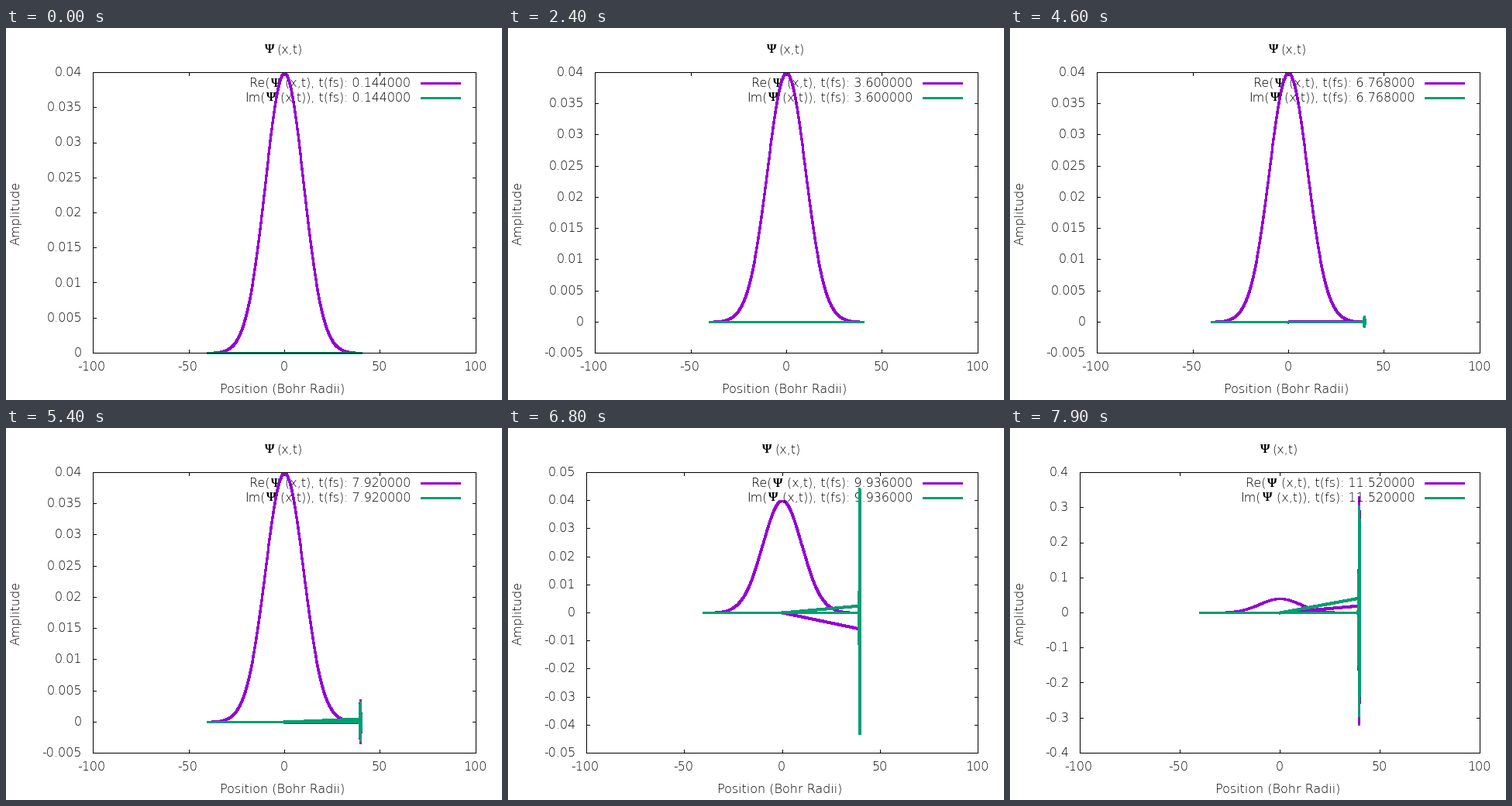
Recreate the animation shown at these times as a matplotlib script. Size 640 px wide and 480 px high, loop 8000 ms.

```python
import numpy as np
import matplotlib.pyplot as plt
from matplotlib.animation import FuncAnimation

W, H = 640, 480
PT = 0.72                       # points per pixel at 100 dpi
PURPLE, GREEN = "#9400d3", "#009e73"
TOP, BOTTOM, RIGHT = 57, 419, 606
KEY_RIGHT = 523
DIGIT = 10.18                   # advance of one digit
FRAMES = 80

plt.rcParams["font.family"] = "DejaVu Sans"
plt.rcParams["path.simplify"] = False

fig = plt.figure(figsize=(W / 100, H / 100), dpi=100, facecolor="white")
ax = fig.add_axes([0, 0, 1, 1])

grid = np.linspace(-40, 40, 801)
packet = np.exp(-grid**2 / 200) / (10 * np.sqrt(2 * np.pi))
edge = np.arange(38.6, 40.001, 0.05)
ripple = np.exp(-((edge - 39.6) / 0.3) ** 2) * (-1.0) ** np.arange(edge.size)
inner = grid < 38.6


def amplitude(n):
    """Size of the exponentially growing instability at the right edge."""
    return 0.0035 * np.exp(0.1825 * (n - 54)) if n else 0.0


def tic_step(span):
    power = 10.0 ** np.floor(np.log10(span))
    count = 20 / (span / power)
    for limit, size in ((10, 0.2), (4, 0.5), (2, 1)):
        if count > limit:
            return size * power
    return 2 * power


def wave(n):
    """x, real part and imaginary part; the path ends back at the origin."""
    a = amplitude(n)
    phase = np.radians(110 - 73.8 * (n - 54))
    tilt = 0.06 * np.cos(2 * phase)
    last = 0.14 * a * np.exp(1j * phase)
    body = np.interp(edge, grid, packet)
    x = np.concatenate([grid[inner], edge, [40, 0]])
    re = np.concatenate([packet[inner], body + a * (0.94 - tilt) * ripple,
                         [last.real, 0]])
    im = np.concatenate([0 * grid[inner], a * (0.94 + tilt) * ripple,
                         [last.imag, 0]])
    return x, re, im


def text(x, y, s, ha="center", z=1, weight=200, **kw):
    ax.text(x - 1, y - 1, s, ha=ha, va="baseline", fontsize=16 * PT,
            weight=weight, zorder=z, **kw)


def psi(x, y, z=1):
    text(x - 1, y, "Ψ", z=z, family="Liberation Serif", weight="bold")


def line(x, y, color="black", width=1, z=6, cap="projecting"):
    """Hard-edged stroke through whole pixels."""
    ax.plot(np.round(x), np.round(y), color=color, lw=width * PT, zorder=z,
            solid_capstyle=cap, solid_joinstyle="round",
            antialiased=False, snap=False)


def key(y, name, tail, color, time, z):
    shift = DIGIT * (len(time) - 8)
    extra = 6.2 * (len(tail) - len("(x,t)"))
    x = KEY_RIGHT - shift - extra
    text(KEY_RIGHT, y, f"{tail}, t(fs): {time}", "right", z)
    psi(x - 174, y, z)
    text(x - 182, y, name, "right", z)
    line([535, 586], [y - 5, y - 5], color, 3, z, "butt")


def draw(n):
    ax.cla()
    ax.set_axis_off()
    ax.set_xlim(-0.5, W - 0.5)
    ax.set_ylim(H - 0.5, -0.5)

    a = amplitude(n)
    low, high = -a, max(packet.max(), a)
    step = tic_step(high - low)
    first, final = int(np.floor(low / step)), int(np.ceil(high / step))
    left = 112 if step < 0.0099 else 101 if step < 0.099 else 90
    mid = (left + RIGHT) / 2

    def px(x):
        return left + (x + 100) * (RIGHT - left) / 200

    def py(y):
        return BOTTOM - (y / step - first) * (BOTTOM - TOP) / (final - first)

    for k in range(first, final + 1):
        y = py(k * step)
        text(left - 13.5, y + 5.5, f"{round(k * step, 6):g}" if k else "0",
             "right")
        line([left, left + 4], [y, y], z=2)
        line([RIGHT, RIGHT - 4], [y, y], z=2)
    for v in range(-100, 101, 50):
        x = px(v)
        text(x - (1 if v < 0 else 0), 443, str(v))
        line([x, x], [BOTTOM, BOTTOM - 4], z=2)
        line([x, x], [TOP, TOP + 4], z=2)

    psi(mid - 18.5, 33)
    text(mid + 24, 33, "(x,t)", "right")
    text(mid - 2, 471, "Position (Bohr Radii)")
    text(18.5, 239.5, "Amplitude", rotation=90, rotation_mode="anchor")

    x, re, im = wave(n)
    time = f"{0.144 * (n + 1):.6f}"
    key(76, "Re(", "(x,t)", PURPLE, time, 2)
    line(px(x), py(re), PURPLE, 3, 3)
    key(95, "Im(", "(x,t))", GREEN, time, 4)
    line(px(x), py(im), GREEN, 3, 5)
    line(px(np.array([-40, 40])), py(np.zeros(2)), GREEN, 3, 5)

    line([left, RIGHT, RIGHT, left, left],
         [TOP, TOP, BOTTOM, BOTTOM, TOP])
    return []


anim = FuncAnimation(fig, draw, frames=FRAMES, interval=100,
                     repeat=True, repeat_delay=0)
plt.show()
```
